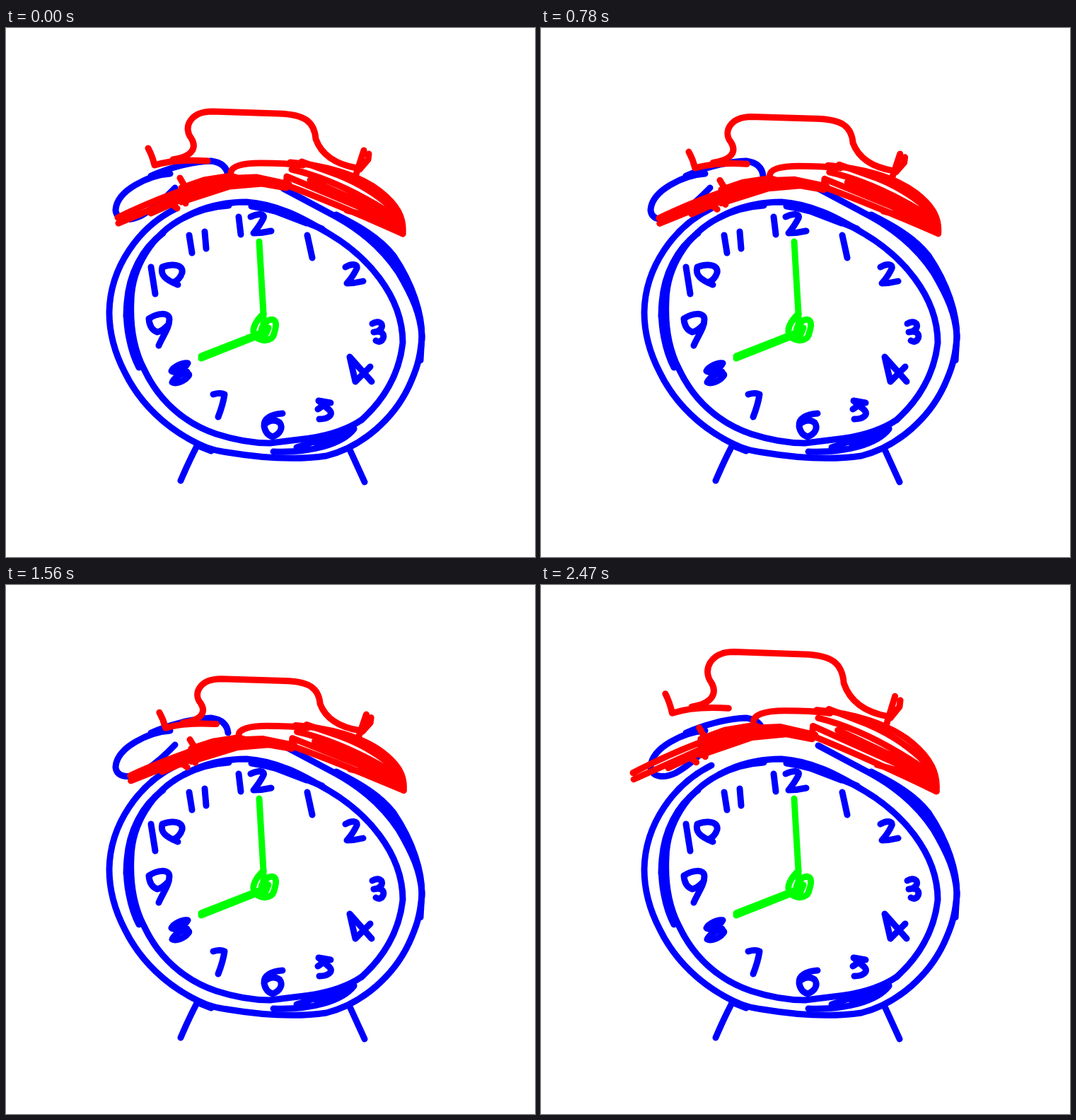
Write an HTML page that moves like this. It is 748x748 px and loops after 2600 ms.

```html
<!DOCTYPE html>
<html>
<head>
<meta charset="utf-8">
<title>Alarm clock</title>
<style>
html, body { margin: 0; width: 100%; height: 100%; overflow: hidden; background: #fff; }
svg { display: block; width: 100%; height: 100%; }
path { fill: none; stroke-width: 9; stroke-linecap: round; stroke-linejoin: round; vector-effect: non-scaling-stroke; }
.blue path { stroke: #00f; }
.red path { stroke: #f00; }
.green path { stroke: #0f0; }
.red .solid { fill: #f00; }
</style>
</head>
<body>
<svg viewBox="0 0 748 748">
  <g class="blue">
    <!-- case -->
    <path d="M241 255C188 281 147 338 146 402C146 432 155 462 168 487C190 532 228 567 272 588C288 596 300 598 313 600C355 607 405 612 453 605C505 592 549 551 570 506C580 484 585 470 588 440C589 405 575 362 548 322C528 296 497 279 467 264"/>
    <path d="M392 227L467 267C505 288 535 316 555 346C575 380 586 405 588 435L586 470M490 279Q535 306 562 348L578 388M270 590L290 598"/>
    <!-- rim -->
    <path d="M252 268C275 255 305 246 340 246C385 249 422 270 457 291C508 321 561 377 561 445C556 490 535 525 503 554"/>
    <path d="M315 251Q282 253 252 268C205 292 178 340 177 385C175 425 181 455 195 482C215 525 250 558 297 574C325 583 350 587 373 587L430 580Q475 573 503 554"/>
    <path d="M188 480C176 458 168 420 171 388C174 348 192 312 222 290M170 408Q170 350 205 306M347 252Q385 258 412 270L447 284M365 253L425 276"/>
    <path d="M378 599C430 601 475 589 492 567M411 593L492 566M430 580L478 576L440 590"/>
    <!-- legs -->
    <path d="M270 591Q259 612 247 640M486 596L507 642"/>
    <!-- numerals -->
    <path d="M329 267L332 292M346 267C356 262 367 262 364 269Q359 279 350 290Q362 290 375 287"/>
    <path d="M426 293L433 325M480 338C488 333 498 333 496 340Q491 351 482 361Q493 361 505 358"/>
    <path d="M518 418C526 413 534 417 531 424Q527 430 520 430C532 427 537 434 532 441Q528 445 523 442"/>
    <path d="M517 500L486 465L494 500L515 479"/>
    <path d="M459 530L442 527L457 540C464 547 455 553 443 553M441 539L453 531"/>
    <path d="M391 545C375 546 364 552 365 563Q367 575 377 578C388 574 392 565 387 558Q377 551 366 560"/>
    <path d="M293 518Q303 515 309 518Q307 532 300 550"/>
    <path d="M257 474C250 472 236 480 234 485C239 490 254 481 257 474M240 488C250 485 262 488 258 492C252 500 240 504 235 501Q239 492 256 486"/>
    <path d="M202 411C214 403 231 401 231 412C231 424 222 435 216 449M202 411Q203 426 214 430Q222 428 229 420"/>
    <path d="M205 338L211 376M221 338C218 349 225 356 243 363M221 338C235 333 251 334 249 346Q246 356 236 360"/>
    <path d="M259 293L263 318M281 288L283 312"/>
    <!-- left bell -->
    <path d="M232 206C203 208 156 229 155 258C157 273 175 273 190 266Q212 254 239 226M205 209C230 198 262 189 290 188Q312 191 314 209"/>
  </g>
  <g class="green">
    <path d="M358 302L364 404V425M276 464L358 432M276 467L352 437"/>
    <path d="M364 404C353 414 346 428 352 434C358 445 377 444 379 432C384 418 382 408 370 414C360 422 358 432 366 436L371 424"/>
  </g>
  <g class="red" id="top">
    <!-- handle -->
    <path d="M201 170Q207 181 210 194Q240 185 285 188M236 186C264 182 270 169 262 156C250 141 260 118 292 118L385 121C422 122 436 132 438 157Q450 190 496 198"/>
    <path d="M506 173L495 207M513 178L512 186L500 200"/>
    <!-- left band -->
    <path d="M158 268Q240 228 318 209M159 276L250 238M205 262L245 244M233 248L242 255M246 212L254 226V248"/>
    <path class="solid" d="M248 226L280 215L318 209L328 212L354 211L400 221L396 226L362 220L316 224L248 246Z"/>
    <!-- right bell -->
    <path d="M318 204Q320 191 360 191Q395 191 420 194M402 190C450 194 498 207 529 231C553 250 563 268 561 291"/>
    <path d="M418 189L470 208Q520 228 553 262M404 200Q470 215 548 265M430 215L545 266M397 210L545 272M397 210L396 222Q470 250 561 291M482 258L552 276"/>
    <path class="solid" d="M535 268L556 270L559 287L544 282Z"/>
  </g>
</svg>
<script>
const STEP = 130, COUNT = 20, PIVOT = [590, 285];
const topPart = document.getElementById('top');

// The shake stretches up on odd steps and squashes on even ones.
function stretch(n) {
  if (n % 2) return n;
  return n < 6 ? -n / 2 : -n;
}

function draw(now) {
  const s = stretch(Math.floor(now / STEP) % COUNT);
  const [x, y] = PIVOT;
  topPart.setAttribute('transform',
    `translate(${x} ${y}) scale(${1 + s * 0.0034} ${1 + s * 0.0074}) translate(${-x} ${-y})`);
  requestAnimationFrame(draw);
}
draw(performance.now());
</script>
</body>
</html>
```
